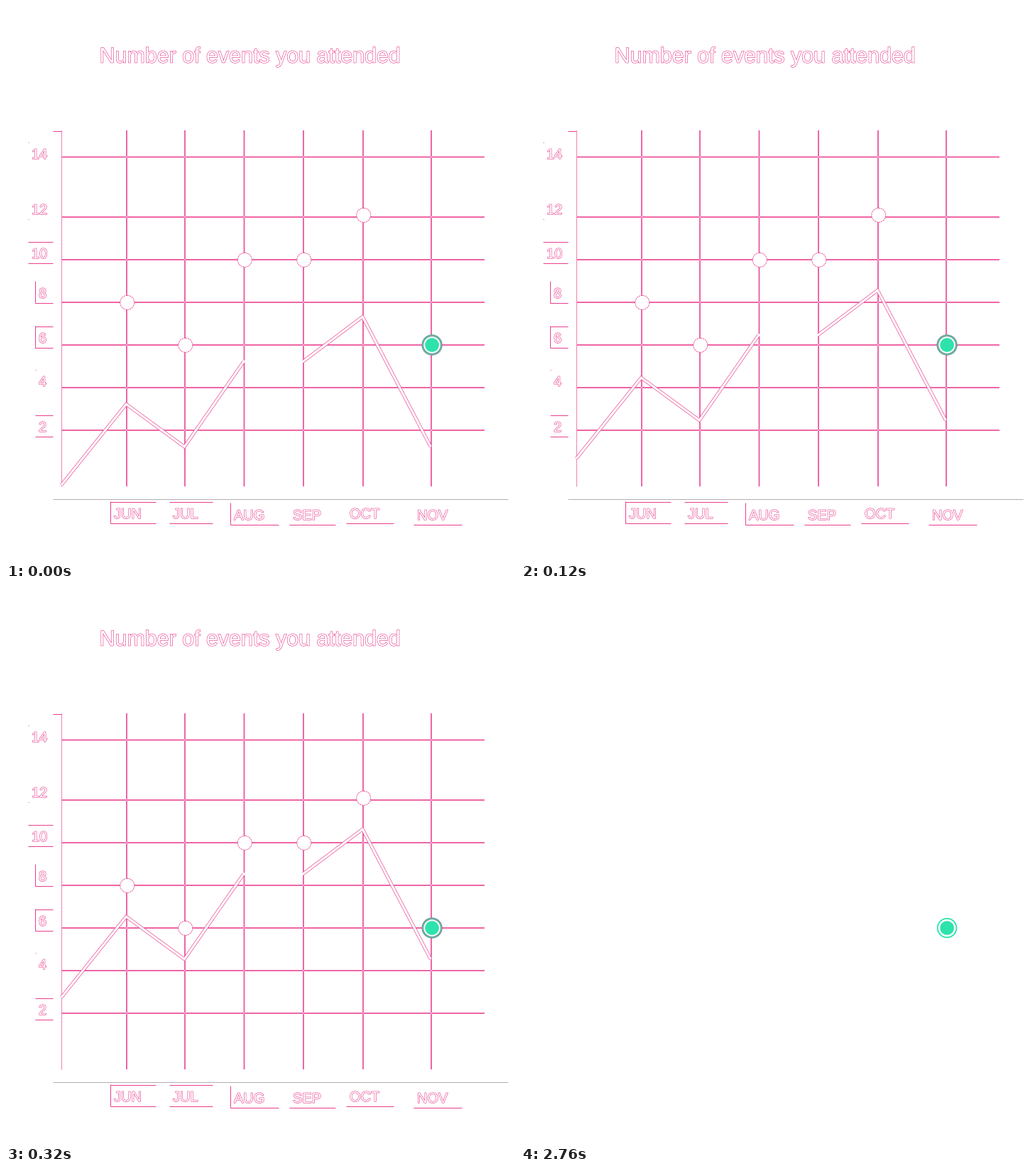
A matplotlib script that plays this animation: 717x781 px, repeating every 2.8 s.

```python
import matplotlib.pyplot as plt
import numpy as np
from matplotlib.animation import FuncAnimation
from matplotlib.patches import Circle
from matplotlib.patheffects import withStroke

W, H, DPI = 717, 781, 64
PX = 72 / DPI  # one pixel in points
FRAMES, INTERVAL = 70, 40
RISE_FRAMES, RISE = 12, 149

LEFT, RIGHT, TOP, BOTTOM = 78, 674, 175, 676
PINK, GRID_PINK, SOFT_PINK, PALE_PINK = "#e93f8e", "#ee559d", "#f27fb3", "#f9bcd8"
GREEN, GREY, RING_GREY = "#2de3ab", "#b3adb0", "#8a7f93"

plt.rcParams["font.family"] = "Liberation Sans"
fig = plt.figure(figsize=(W / DPI, H / DPI), dpi=DPI, facecolor="white")
ax = fig.add_axes([0, 0, 1, 1])
ax.set(xlim=(0, W), ylim=(H, 0))
ax.axis("off")
chart = []  # everything that vanishes on the last frame


def line(xs, ys, color=PINK, width=1.0, z=1, snap=None):
    artist, = ax.plot(xs, ys, color=color, lw=width * PX, zorder=z, snap=snap,
                      solid_capstyle="butt", solid_joinstyle="miter")
    chart.append(artist)
    return artist


def rule(x0, x1, y, color=PINK):
    line([x0, x1], [y + 0.5, y + 0.5], color)


def label(x, baseline, text, size=20):
    artist = ax.text(
        x, baseline, text, fontsize=size * PX, color="white", va="baseline",
        path_effects=[withStroke(linewidth=1.2 * PX, foreground=PINK)])
    chart.append(artist)
    return artist


def box(x0, x1, baseline, sides):
    """Draw the named parts: t, b, l are edges, dots are single corners."""
    top, bottom = baseline - 24, baseline + 6
    for part, end, y in [("t", x1, top), ("b", x1, bottom),
                         (".", x0 + 1, top), (",", x0 + 1, bottom)]:
        if part in sides:
            rule(x0, end, y)
    if "l" in sides:
        line([x0, x0], [top, bottom + 1])


def circle(x, y, r, face="none", edge="none", width=0.0, z=5, style="-"):
    return ax.add_patch(Circle((x, y), r, fc=face, ec=edge, lw=width * PX,
                               zorder=z, ls=style))


# Grid and axes
columns = np.array([170, 252, 335.5, 419, 503, 599])
rows = [*(597 - 60 * np.arange(6)), 212.5]
for y in rows:
    line([LEFT, RIGHT], [y, y], GRID_PINK, 1.8, snap=False)
for x in columns:
    line([x, x], [TOP, BOTTOM], GRID_PINK, 1.8, snap=False)
    for y in rows:
        line([x - 1, x + 1], [y, y], PALE_PINK, 1.8, 1.5, snap=False)
line([LEFT - 0.5] * 2, [TOP, BOTTOM], SOFT_PINK)
rule(66, LEFT, TOP)
rule(66, 707, 693, GREY)

# Title and labels, with fragments of the boxes around them
label(131.6, 79.7, "Number of events you attended", 30.4)
for text, baseline, sides in [("14", 215, "."), ("12", 293, ","),
                              ("10", 355, "tb"), ("8", 411, "lb"),
                              ("6", 474, "ltb"), ("4", 535, "."),
                              ("2", 599, "tb")]:
    x = 56 - 10 * len(text)
    label(x, baseline, text)
    box(x - 5, 66, baseline, sides)
for text, x, baseline, sides in [("JUN", 152, 721, "ltb"),
                                 ("JUL", 235, 721, "tb"),
                                 ("AUG", 321, 723, "lb"),
                                 ("SEP", 404, 723, "b"),
                                 ("OCT", 484, 721, "b"),
                                 ("NOV", 579, 723, "b")]:
    month = label(x, baseline, text)
    box(x - 5.5, x + month.get_window_extent().width + 20, baseline, sides)

# Data values set both the markers and the line
values = np.array([8, 6, 10, 10, 12.1, 6])
marker_x, marker_y = columns + 0.8, 657.3 - 30 * values
line_x = np.append(LEFT, columns - 0.7)
line_y = np.append(525, marker_y - 6)

# White band whose sloped parts have pink edges
slopes = [slice(0, 4), slice(4, 7)]
bands = [(line(line_x[s], line_y[s], PINK, 4.5, 2), s) for s in slopes]
bands.append((line(line_x, line_y, "white", 3.2, 3), slice(None)))

for x, y in zip(marker_x[:-1], marker_y):
    chart.append(circle(x, y, 10, "white", PINK, 0.8, style=(0, (3, 1))))
last = marker_x[-1] + 0.3, marker_y[-1] - 0.3
circle(*last, 13.3, "white", GREEN, 1.8)
circle(*last, 9.8, GREEN, z=6)
for r in (14.2, 12.3):
    chart.append(circle(*last, r, edge=RING_GREY, width=0.9, z=6))


def update(frame):
    drop = RISE * max(1 - frame / RISE_FRAMES, 0)
    for band, part in bands:
        band.set_ydata(line_y[part] + drop)
    for artist in chart:
        artist.set_visible(frame < FRAMES - 1)
    return chart


anim = FuncAnimation(fig, update, frames=FRAMES, interval=INTERVAL,
                     repeat=True, repeat_delay=0, blit=False)
plt.show()
```
